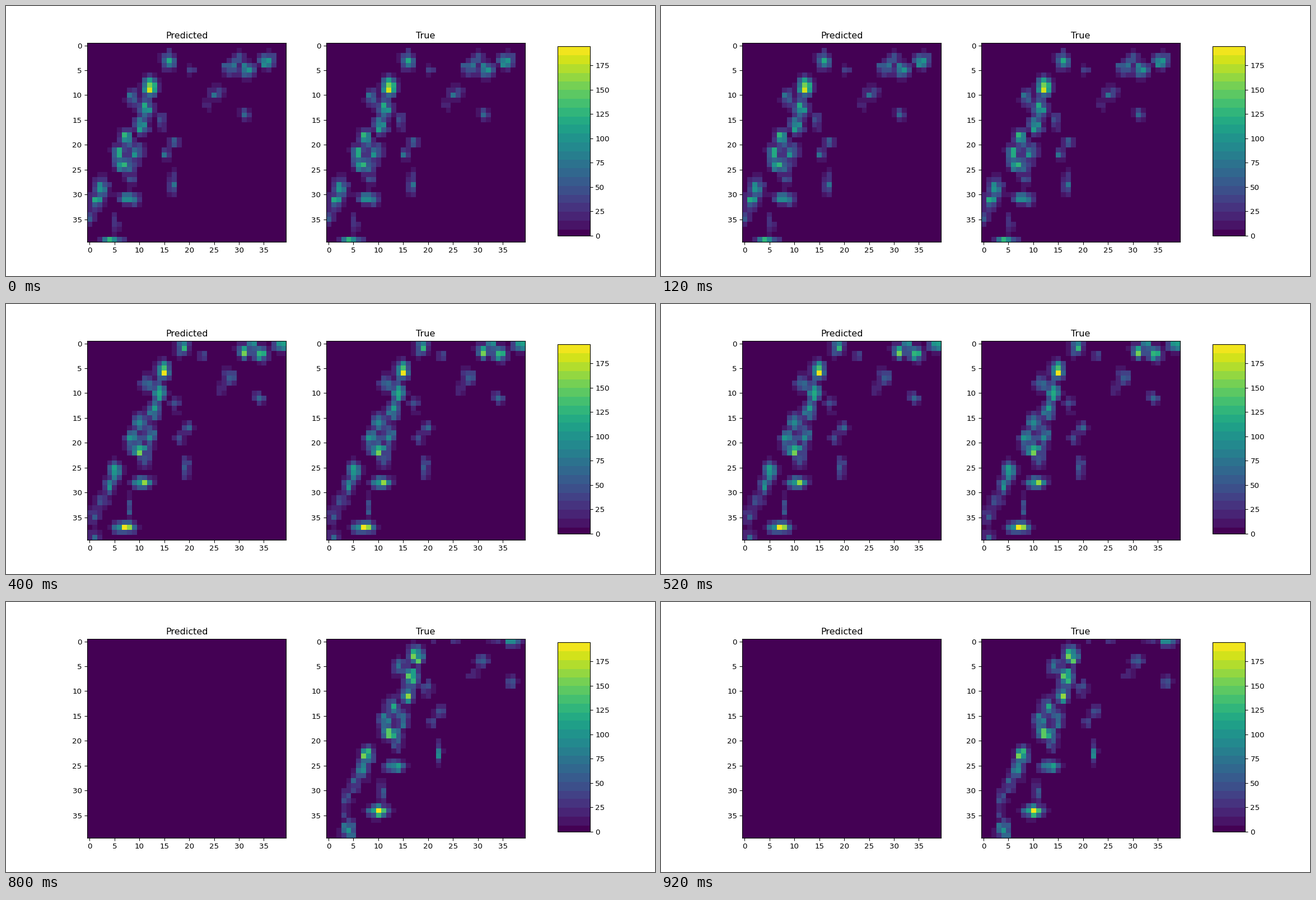
These frames come from a looping animation (1159 px wide and 483 px high, 1000 ms). A matplotlib script:

```python
import numpy as np
import matplotlib.pyplot as plt
from matplotlib.animation import FuncAnimation
from matplotlib.colors import ListedColormap

DPI = 96
SIZE, STEPS, VMAX = 40, 5, 194.3
DRIFT = np.array([1.35, -1.4])  # cells per step
MIDDLE = 2  # step at which the rain cells below are placed


class Band:
    """A chain of rain cells (x, y, peak) that share one width and height."""

    def __init__(self, rx, ry, *cells):
        self.rx, self.ry, self.cells = rx, ry, cells

    def field(self, step, gx, gy):
        total = np.zeros_like(gx)
        for x, y, peak in self.cells:
            cx, cy = np.array([x, y]) + DRIFT * (step - MIDDLE)
            d2 = ((gx - cx) / self.rx) ** 2 + ((gy - cy) / self.ry) ** 2
            total = np.maximum(total, peak * np.exp(-d2 / 2))
        return total


bands = [
    # main front, north to south
    Band(0.9, 1.2, (18.6, 0.4, 105), (14.8, 5.5, 165), (14, 9.9, 140),
         (11.5, 8, 65), (13, 13.5, 105), (10.1, 16, 95), (8.6, 19, 105),
         (12, 18.5, 75), (11, 23.3, 50)),
    # wide cores at the southern end
    Band(1.3, 0.75, (9.9, 21.3, 155), (10.5, 28, 120), (7.2, 37, 165)),
    # western line
    Band(0.9, 1.2, (5, 25.7, 115), (4, 28.5, 85), (2.5, 31.5, 50),
         (0.9, 34.5, 42), (0.8, 38, 22), (1.2, 40.6, 105)),
    # north-eastern cluster
    Band(0.95, 0.95, (31, 1.6, 85), (34.3, 2.2, 135), (38.3, 0.2, 125),
         (32.6, 0.2, 65), (28, 6.7, 55), (26.3, 9.2, 20)),
    # scattered showers
    Band(0.75, 0.8, (22.8, 2.2, 32), (19.7, 16.8, 60), (18.1, 19, 42),
         (34, 11, 60), (17.1, 12, 52), (17.3, 13.5, 25)),
    # thin streaks
    Band(0.5, 1.6, (8, 33, 45), (19.4, 25.2, 60)),
]


def rain(step):
    gy, gx = np.mgrid[:SIZE, :SIZE].astype(float)
    field = np.max([b.field(step, gx, gy) for b in bands], axis=0)
    rng = np.random.default_rng(20 + step)
    field *= np.exp(rng.normal(0, 0.28, field.shape))
    return np.where(field < 9, 0, np.minimum(field, VMAX))


def banded_viridis(first=6, width=8.97):
    v = np.linspace(0, VMAX, 256)
    band = np.floor((v - first) / width)
    mid = np.where(band < 0, 0, first + (band + 0.5) * width)
    return ListedColormap(plt.get_cmap("viridis")(mid / VMAX))


maps = [rain(step) for step in range(STEPS)]
blank = np.zeros((SIZE, SIZE))

fig, axes = plt.subplots(1, 2, figsize=(1159 / DPI, 483 / DPI), dpi=DPI)
fig.subplots_adjust(left=0.125, right=0.8, bottom=0.11, top=0.88, wspace=0.2)
images = []
for ax, title in zip(axes, ("Predicted", "True")):
    images.append(ax.imshow(blank, cmap=banded_viridis(), vmin=0, vmax=VMAX,
                            interpolation="nearest"))
    ax.set_title(title)
    ax.set_xticks(range(0, SIZE, 5))
    ax.set_yticks(range(0, SIZE, 5))
cax = fig.add_axes([0.85, 0.15, 0.05, 0.7])
fig.colorbar(images[1], cax=cax, ticks=range(0, 176, 25))


def update(step):
    # the last step has no forecast
    images[0].set_data(blank if step == STEPS - 1 else maps[step])
    images[1].set_data(maps[step])
    return images


anim = FuncAnimation(fig, update, frames=STEPS, interval=200,
                     repeat=True, repeat_delay=0)
plt.show()
```
